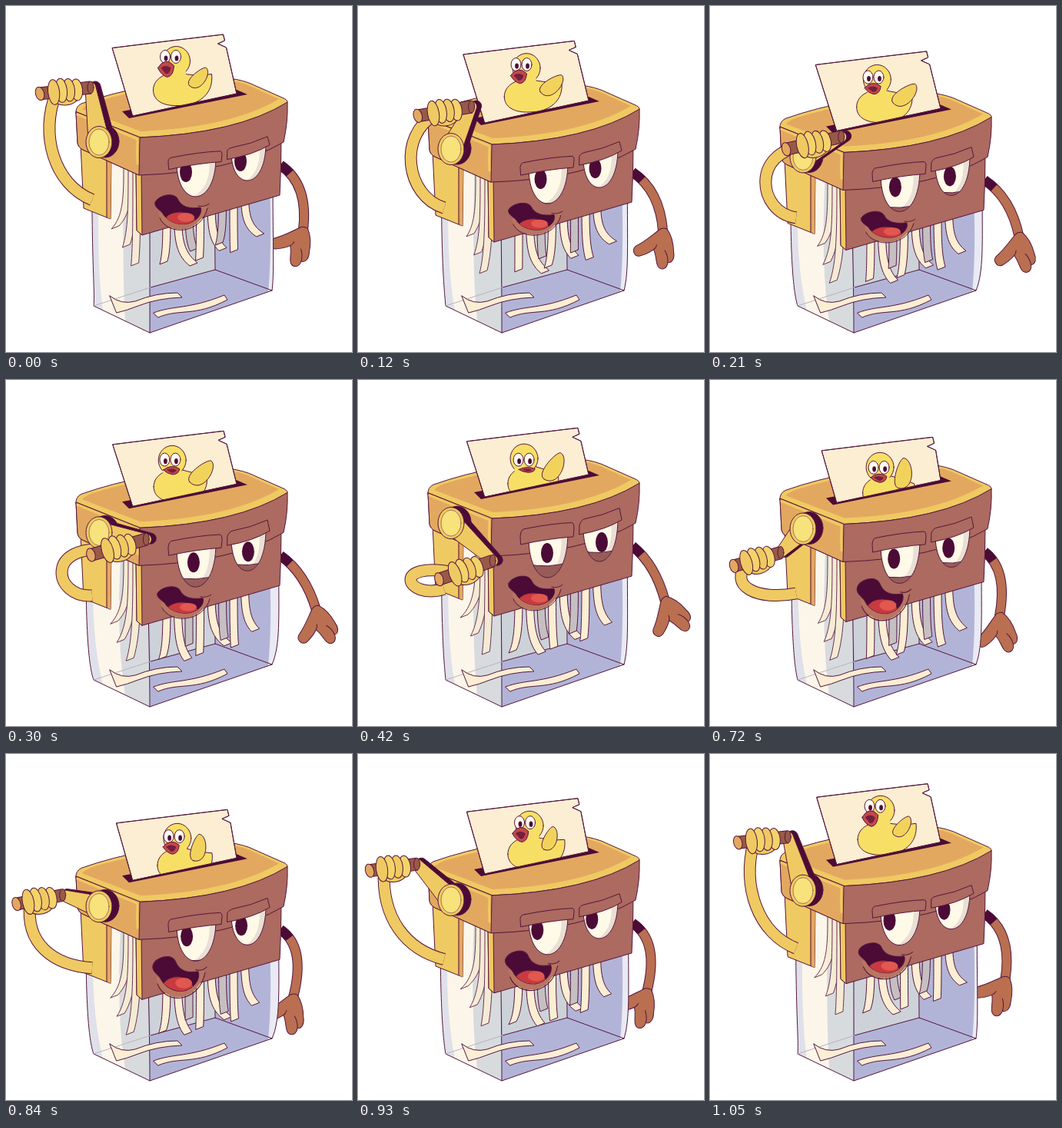
An HTML page that plays this animation: 450x450 px, repeating every 1.08 s.

```html
<!DOCTYPE html>
<html lang="en">
<head>
<meta charset="utf-8">
<title>Paper shredder</title>
<style>
html, body { margin: 0; width: 100%; height: 100%; overflow: hidden; background: #fff; }
svg { display: block; width: 100%; height: 100%; }
</style>
</head>
<body>
<svg id="stage" viewBox="0 0 450 450" stroke-linejoin="round" stroke-linecap="round"></svg>
<script>
const LOOP = 1080, STEP = 30;
const INK = '#55163d', DARK = '#4b0b36', BROWN = '#ac6a60', SHADE = '#985c58', ORANGE = '#e3a85f',
  YELLOW = '#efc962', PALE = '#f7e27c', CREAM = '#fbeed3', LEMON = '#f7df66', SKIN = '#b96f50', WOOD = '#985a48';

const add = (p, x, y) => [p[0] + x, p[1] + y];
const mid = (a, b) => [(a[0] + b[0]) / 2, (a[1] + b[1]) / 2];
const turned = (x, y, degrees) => {
  const a = degrees * Math.PI / 180;
  return [x * Math.cos(a) - y * Math.sin(a), x * Math.sin(a) + y * Math.cos(a)];
};

// The crank turns once per loop while the body sinks twice; every part follows that turn.
function poseAt(t) {
  const turn = 2 * Math.PI * t / LOOP, c = Math.cos(turn), s = Math.sin(turn);
  const dy = 11 * (1 - Math.cos(2 * turn));

  const pivot = [121, 177 + dy];
  const crankEnd = add(pivot, 7 - 18 * c + 52 * s, -3 - 68 * c);
  const grip = add(crankEnd, -66 - 6 * s, 16 - 8 * c + 3 * s);
  const fist = mid(grip, crankEnd);
  const armBase = [112, 258 + dy - 6 * c];
  const armLow = [62, armBase[1] - 20 * c];
  const armHigh = add(fist, -58 + 25 * c - 35 * s, 26 + 30 * c - 27 * s);

  const palm = [387 - 7 * c + 17 * s, 298 + dy + 4 * c - 8 * s];
  const palmTurn = -24 + 26 * c - 10 * s;
  const elbow = [390 + 4 * c, 232 + dy * .9];

  const paper = [141.5 - 3 * c - 3 * s, 65.5 + dy - 11 * c - 5 * s];
  const head = add(paper, 78 + 5 * c, 20 - 3 * c);
  return {
    turn, dy, pivot, crankEnd, grip, fist, armBase, armLow, armHigh, palm, palmTurn, elbow, paper, head,
    body: add(paper, 90, 52),
    tail: add(paper, 123 + 6 * c, 40 - 6 * c),
    wing: add(paper, 100, 49),
    wingTip: add(paper, 118 + 4 * c + 11 * s, 18 + 8 * c + 5 * s),
    eyes: add(head, -3.5 - 4 * c, -1.5 - 4 * c),
    beak: add(head, -5 - 9 * c + 2 * s, 12 - 3 * c),
    beakOpen: 12 + 6.5 * c - 1.5 * s,
    pupil: [239.5 - 5.5 * c + 3.5 * s, 216],
    browLift: 3.5 - 4 * c + s,
    lid: 8 - 9 * c + 3 * s,
    mouthOpen: 1.02 - .04 * c - .14 * s,
    mouthX: 3 * s,
    stripGrow: 6 - 6 * c - s
  };
}

const shape = (d, fill, extra = '') =>
  `<path d="${d}" fill="${fill}" stroke="${INK}" ${extra}/>`;
const flat = (d, fill) => `<path d="${d}" fill="${fill}"/>`;
const line = (d, color = INK, width = 1, extra = '') =>
  `<path d="${d}" fill="none" stroke="${color}" stroke-width="${width}" ${extra}/>`;
const oval = (x, y, rx, ry, fill, extra = '') =>
  `<ellipse cx="${x}" cy="${y}" rx="${rx}" ry="${ry}" fill="${fill}" stroke="${INK}" ${extra}/>`;
const spot = (x, y, rx, ry, fill) => oval(x, y, rx, ry, fill, 'stroke-width="0"');
const tube = (d, width, color) =>
  line(d, INK, width + 1, 'stroke-linecap="butt"') + line(d, color, width - 1, 'stroke-linecap="butt"');
const clipped = (id, d, body) =>
  `<clipPath id="${id}"><path d="${d}"/></clipPath><g clip-path="url(#${id})">${body}</g>`;
const repeat = (n, draw) => Array.from({ length: n }, (_, i) => draw(i)).join('');

function ribbon(x, y, dx, length, fill) {
  const width = 10, ex = x + dx, ey = y + length;
  return shape(`M${x} ${y} C${x} ${y + length * .5} ${ex - dx} ${ey - length * .2} ${ex} ${ey}
    L${ex + width} ${ey - 4} C${ex + width - dx} ${ey - length * .25} ${x + width} ${y + length * .5} ${x + width} ${y} Z`, fill);
}

function frontStrips({ turn, dy, stripGrow }) {
  return repeat(8, i => {
    const x = 204 + i * 14.5, top = 262 - i * 4;
    const edge = 290 - i * 4, sway = 4 * Math.sin(2 * turn + i);
    const length = edge + 46 + 9 * Math.sin(i * 2.4) - top + stripGrow;
    return ribbon(x, top + dy, 6 + 12 * Math.sin(i * 2.2 - 1) + sway, length, i % 3 === 2 ? '#c6bfc1' : CREAM);
  });
}

function sideStrips({ turn, dy, stripGrow }) {
  return repeat(3, i => ribbon(153 + i * 6, 205 + dy, -16 + i * 5 + 4 * Math.sin(2 * turn + i), 85 + i * 24 + stripGrow, CREAM));
}

function glass(pose) {
  const { dy } = pose, bulge = dy / 22 * 8, top = 205 + dy;
  const lx = 112 - bulge, rx = 347 + bulge, mx = 187 - bulge * .5;
  const left = `${lx} ${top} C${lx - 1} 330 ${lx + 4} 375 114 390`;
  const right = `346 370 C${rx + 2} 345 ${rx} 310 ${rx} ${top + 20}`;
  return flat(`M${mx} ${top} L187 425 L${right} Z`, '#b2b4d7')
    + flat(`M${mx} ${top} H271 L272 343 L188 366 Z`, '#cdd2d9')
    + flat(`M${right} H343 Q346 320 341 372 Z`, '#e9eaf3')
    + line(`M188 366 L272 343 L346 370 M272 343 L271 ${top}`)
    + frontStrips(pose)
    + flat(`M${left} L187 425 L${mx} ${top} Z`, '#d7dbde')
    + flat(`M${left} L155 409 Q${151 - bulge} 340 ${153 - bulge * .5} ${top} Z`, '#fcf6ea')
    + flat(`M${left} L126 396 Q${117 - bulge} 330 ${lx + 10} ${top} Z`, '#dfe0e9')
    + `<g opacity=".85">${sideStrips(pose)}</g>`
    + line(`M${left} L187 425 L${right} M187 425 Q187 360 ${mx} ${top}`)
    + line('M114 390 L188 366', '#b9b2c2')
    + shape('M135 377 Q150 389 168 384 Q195 373 223 373 L229 379 Q197 380 172 390 Q157 396 144 399 Z', CREAM)
    + shape('M192 399 C218 389 237 395 284 376 L288 382 C245 405 225 393 198 405 Z', CREAM);
}

function lidTop() {
  return shape('M91 140 Q90 131 98 127 Q180 98 285 94 Q299 94 316 100 L359 119 Q367 122 366 126 Q300 166 174 171 Z', YELLOW)
    + flat('M99 134 Q102 130 112 126 Q190 102 287 97 Q301 97 315 103 L355 121 Q292 158 175 163 Z', ORANGE)
    + flat('M151 137 L300 109 L314 115 L160 146 Z', DARK);
}

function casing() {
  return shape('M97 180 L101 263 L136 277 L137 196 Z', YELLOW)
    + flat('M130 195 V274 L136 277 L137 196 Z', ORANGE) + line('M131 196 V275')
    + shape('M169 210 L170 292 L177 298 L356 246 Q358 210 358 172 Z', BROWN)
    + shape('M169 212 L170 292 L177 298 L176 216 Z', YELLOW)
    + shape('M91 138 L93 178 Q94 184 100 187 L173 220 Q295 216 361 177 Q367 150 366 125 Q300 166 174 171 Z', BROWN)
    + shape('M91 138 L93 178 Q94 184 100 187 L173 220 L174 171 Z', ORANGE)
    + line('M93 141 L171 173 Q170 190 171 205', YELLOW, 3);
}

function eye(id, l, r, yl, yr, bottom, [px, py], lid) {
  const depth = (bottom - (yl + yr) / 8) / .75, lidY = bottom + 3 - lid * 1.1;
  const socket = `M${l} ${yl} C${l} ${depth} ${r} ${depth} ${r} ${yr} Z`;
  const lidEdge = `M${l - 5} ${lidY - 3} Q${(l + r) / 2} ${lidY + 5} ${r + 5} ${lidY - 6}`;
  return clipped(id, socket, flat(socket, '#fff9e8')
      + flat(`M${r - 9} ${yr} Q${r - 4} ${bottom - 8} ${l + 12} ${bottom + 4} H${r + 4} V${yr} Z`, '#e9dfd4')
      + spot(px, py, 8, 13, DARK)
      + shape(`${lidEdge} V${bottom + 20} H${l - 5} Z`, SHADE))
    + line(socket);
}

function face({ browLift: lift, lid, pupil, mouthOpen, mouthX }) {
  const mouth = 'M194 255 C198 246 217 241 223 250 C228 262 239 264 253 262 C256 270 248 282 233 284 C217 285 207 276 204 270 C201 265 192 262 194 255 Z';
  const thick = lift * .6;
  return eye('eyeL', 222, 273, 203 - lift, 196 - lift, 248, pupil, lid)
    + eye('eyeR', 293, 338, 190 - lift, 178 - lift, 227, add(pupil, 71, -14), lid * .8)
    + `<g transform="translate(0 ${-lift})">`
    + shape(`M211 201 Q212 ${196 - thick} 217 ${196 - thick} Q252 ${189 - thick} 278 ${188 - thick} Q281 ${188 - thick} 281 192 L280 202 Q250 204 212 212 Z`, BROWN)
    + shape(`M288 187 Q290 ${184 - thick} 295 ${183 - thick} Q318 ${179 - thick} 340 ${169 - thick} L343 180 Q322 193 288 199 Z`, BROWN)
    + `</g><g transform="translate(${mouthX} ${265 * (1 - mouthOpen)}) scale(1 ${mouthOpen})">`
    + flat('M198 268 C204 299 252 301 262 260 Z', '#b8755f')
    + shape(mouth, DARK)
    + clipped('mouth', mouth, oval(226, 282, 21, 14, '#c93a40') + spot(234, 275, 11, 6, '#e0584f'))
    + line('M200 276 C210 300 254 298 262 263 M250 260 Q258 262 264 257') + '</g>';
}

function duck({ head: [hx, hy], body: [bx, by], tail: [tx, ty], wing: [wx, wy], wingTip: [px, py],
  eyes: [ex, ey], beak: [kx, ky], beakOpen: h }) {
  const nx = (py - wy) * .34, ny = (wx - px) * .34;
  const eyeAt = (x, y) => oval(x, y, 6.5, 8.5, '#fffaf0') + spot(x + 1, y + 2, 2.4, 3.6, DARK);
  return shape(`M${bx - 37} ${by + 3} C${bx - 37} ${by - 13} ${bx - 20} ${by - 20} ${bx - 4} ${by - 20}
      Q${bx + 18} ${by - 14} ${tx} ${ty} C${tx + 3} ${by + 8} ${bx + 22} ${by + 23} ${bx - 4} ${by + 23}
      C${bx - 25} ${by + 24} ${bx - 37} ${by + 16} ${bx - 37} ${by + 3} Z`, LEMON)
    + shape(`M${wx} ${wy} C${wx + nx} ${wy + ny} ${px + nx * .4} ${py + ny * .4} ${px} ${py}
      C${px - nx} ${py - ny} ${wx - nx * 1.7} ${wy - ny * 1.7} ${wx} ${wy} Z`, '#f1d35c')
    + oval(hx, hy, 18, 19, LEMON)
    + flat(`M${hx - 12} ${hy + 10} Q${hx} ${hy + 17} ${hx + 12} ${hy + 9} L${hx + 13} ${hy + 25} H${hx - 13} Z`, LEMON)
    + eyeAt(ex - 7, ey) + eyeAt(ex + 7, ey)
    + shape(`M${kx - 10} ${ky} Q${kx} ${ky - h * .85} ${kx + 11} ${ky - h * .15}
      Q${kx + 10} ${ky + h * .6} ${kx + 2} ${ky + h * .65} Q${kx - 6} ${ky + h * .5} ${kx - 10} ${ky} Z`, '#c5484a')
    + flat(`M${kx - 6} ${ky} Q${kx} ${ky - h * .3} ${kx + 7} ${ky} Q${kx + 5} ${ky + h * .5} ${kx} ${ky + h * .4} Z`, '#71203d');
}

function sheet(pose) {
  const [lx, ly] = pose.paper;
  const outline = `M${lx} ${ly} q72 -9 144 -17.5 l2 8 l-9 4 l11 5 L300 ${114 + pose.dy} L165 ${143 + pose.dy} Z`;
  return shape(outline, CREAM) + clipped('sheet', outline, duck(pose)) + line(outline);
}

function rightArm({ dy, palm, palmTurn, elbow }) {
  const arm = `M357 ${207 + dy} Q${elbow} ${add(palm, ...turned(6, -10, palmTurn))}`;
  return tube(arm, 12, SKIN) + line(arm, DARK, 12, 'stroke-dasharray="16 400" stroke-linecap="butt"')
    + `<g transform="translate(${palm}) rotate(${palmTurn})">`
    + shape(`M0 -13 C-10 -8 -20 -2 -31 1 C-39 4 -37 15 -29 15 Q-18 14 -10 10 C-8 18 -10 24 -9 31
      C-7 39 2 39 5 30 C11 32 15 25 15 18 Q18 0 12 -13 Q6 -17 0 -13 Z`, SKIN)
    + line('M5 30 Q7 22 4 14 M-10 10 Q-7 9 -5 5') + '</g>';
}

function taper(a, b, wide, narrow, fill) {
  const angle = Math.atan2(b[1] - a[1], b[0] - a[0]) * 180 / Math.PI;
  const corner = (p, offset) => add(p, ...turned(0, offset, angle));
  return shape(`M${corner(a, wide)} L${corner(b, narrow)} A${narrow} ${narrow} 0 0 0 ${corner(b, -narrow)} L${corner(a, -wide)} Z`, fill);
}

function crank({ pivot, crankEnd, grip }) {
  const [x, y] = pivot;
  return oval(x + 8, y - 1, 18, 21, DARK) + taper([x + 7, y - 2], add(crankEnd, 6, -1), 14, 7, DARK)
    + taper(pivot, crankEnd, 14, 7, YELLOW) + oval(x, y, 17, 20.5, YELLOW)
    + oval(x, y, 13, 17, PALE, 'stroke-opacity=".5"')
    + tube(`M${grip} L${crankEnd}`, 16, WOOD) + oval(...crankEnd, 4, 8, WOOD)
    + oval(...grip, 5.5, 8.8, ORANGE, `transform="rotate(-16 ${grip})"`);
}

const leftArm = ({ armBase, armLow, armHigh, fist }) =>
  tube(`M${armBase} C${armLow} ${armHigh} ${add(fist, -12, 4)}`, 15, YELLOW);

function leftHand({ fist, grip, crankEnd }) {
  const angle = Math.atan2(crankEnd[1] - grip[1], crankEnd[0] - grip[0]) * 180 / Math.PI;
  const knuckle = i => oval(15 - i * 10, -1 + Math.abs(1.8 - i), 7.5, 14 + i * .8, i % 2 ? YELLOW : '#f3d46b');
  return `<g transform="translate(${fist}) rotate(${angle})">${oval(0, 6, 18, 13, YELLOW)}${repeat(4, knuckle)}</g>`;
}

function render(t) {
  const pose = poseAt(t);
  const sunk = body => `<g transform="translate(0 ${pose.dy})">${body}</g>`;
  return rightArm(pose) + glass(pose) + sunk(lidTop()) + sheet(pose)
    + sunk(casing() + face(pose)) + leftArm(pose) + crank(pose) + leftHand(pose);
}

const stage = document.getElementById('stage');
const start = performance.now();
let shown = -1;
function tick() {
  const t = Math.floor((performance.now() - start) % LOOP / STEP) * STEP;
  if (t !== shown) stage.innerHTML = render(shown = t);
  requestAnimationFrame(tick);
}
tick();
</script>
</body>
</html>
```
